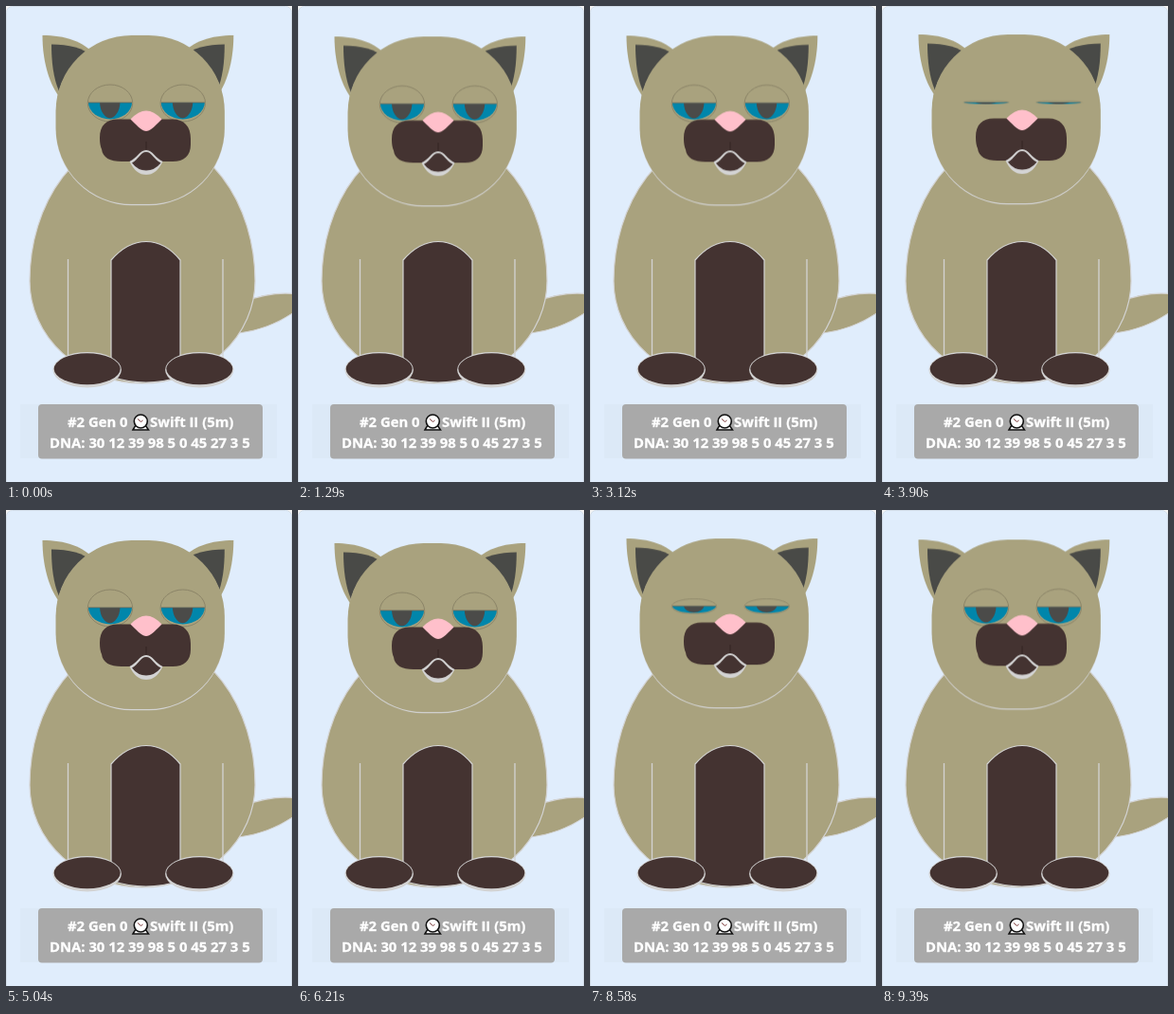
Write an HTML page without scripts that moves like this. It is 302 px wide and 502 px high and loops after 9.42 s.

```html
<!DOCTYPE html>
<html lang="en">
<head>
<meta charset="utf-8">
<title>Cat card</title>
<style>
  html, body { margin: 0; width: 100%; height: 100%; overflow: hidden; background: #f4f4f4; }
  svg { display: block; width: 302px; height: 502px; }
  .fur { fill: #a9a27e; }
  .dark { fill: #443331; }
  .edge { stroke: #d3d3d3; stroke-width: 1.2; }
  .rim { fill: #d3d3d3; }
  .inner { fill: #494a47; }
  .leg { fill: none; stroke: #d3d3d3; stroke-width: 1.3; }
  .lid { stroke: #5f655c; stroke-width: .8; vector-effect: non-scaling-stroke; }
  text {
    font: bold 14.85px "Open Sans", "Noto Sans", sans-serif;
    fill: #fff;
    stroke: #fff;
    stroke-width: .3;
  }

  /* bob and blink share one 942ms cycle */
  .head { animation: bob 942ms -810ms infinite; }
  .eye {
    transform-box: fill-box;
    transform-origin: center;
    animation: blink 942ms -810ms linear infinite;
  }
  @keyframes bob {
    0%, 100% { transform: translateY(-.9px); animation-timing-function: ease-in-out; }
    50% { transform: translateY(4.1px); animation-timing-function: ease-in-out; }
  }
  @keyframes blink {
    0%, 100% { transform: scaleY(.1); }
    9%, 91% { transform: scaleY(1); }
  }
</style>
</head>
<body>
<svg viewBox="0 0 302 502">
  <defs>
    <g id="ear">
      <path class="fur" d="M38.500 31C38.500 59 46 84 58 98L94 52C82 37 62 31 38.500 31Z"/>
      <path class="inner" d="M48 40.500C48 59 50 76 56 90L92 54C82 44 66 40.500 48 40.500Z"/>
    </g>
    <g id="eye">
      <ellipse class="fur" cx="110" cy="102.500" rx="23.700" ry="19.500" stroke="#8b8468"/>
      <path d="M87 101.900H133A23 17.500 0 0 1 87 101.900Z" fill="#0086ab"/>
      <path d="M99 101.900H120.500C120 111 115 118.300 109.700 118.300S99.500 111 99 101.900Z" fill="#4b4b49"/>
      <path class="lid" d="M87 101.900H133"/>
    </g>
    <g id="foot">
      <ellipse class="rim" cx="85.700" cy="383.700" rx="36.200" ry="18.800"/>
      <ellipse class="dark" cx="85.700" cy="382.700" rx="35" ry="16.500"/>
    </g>
  </defs>

  <rect x=".5" y=".5" width="301" height="510" rx="6" fill="#e0edfc" stroke="#d3deea"/>

  <path class="fur edge" d="M250 312Q280 301 304 303.500V323Q278 341 246 345Z"/>
  <path class="fur edge" d="M25 290A119 155 0 0 1 263 290A119 108 0 0 1 25 290Z"/>
  <path class="dark edge" d="M111 268Q128 248.500 148 248.500T184 268V391Q148 403 111 391Z"/>
  <path class="leg" d="M65.500 267V372M229 267V372"/>
  <use href="#foot"/>
  <use href="#foot" x="118.600"/>

  <g class="head">
    <use href="#ear"/>
    <use href="#ear" transform="matrix(-1 0 0 1 278.800 0)"/>
    <rect class="rim" x="52.600" y="32.200" width="178.200" height="178" rx="80"/>
    <rect class="fur" x="52.600" y="31" width="178.200" height="178" rx="80"/>

    <g class="eye"><use href="#eye"/></g>
    <g class="eye"><use href="#eye" x="76.800"/></g>

    <path class="dark" d="M99 139C99 126 106 119.500 118 119.500H176C188 119.500 195 127 195 140V146C195 158 188 164 176 164H122C110 164 102 160 101 151Q99 147 99 139Z"/>
    <path class="rim" d="M130.500 164C138 161 141 152 148 152S158 161 165.500 164Q159 178 148 178T130.500 164Z"/>
    <path class="dark" d="M133 165.500C140 162 142 154 148 154S156 162 163.500 165.500Q157 173.500 148 173.500T133 165.500Z"/>
    <path d="M148 143V152" stroke="#332523"/>
    <path d="M131.500 119.500Q140 110.500 148 110.500T164.500 119.500C156 128 152 132 148 132S140 128 131.500 119.500Z" fill="#ffc0cb"/>
  </g>

  <rect x="15" y="420" width="271" height="57" fill="#dce9f7"/>
  <rect x="34" y="420" width="237" height="57.500" rx="4" fill="#a9a9a9"/>
  <text x="65" y="444">#2 Gen 0</text>
  <g stroke="#111" fill="#fff">
    <path d="M134 447L137 442H147L150.500 447Z" stroke-width="1.500"/>
    <circle cx="142.300" cy="438" r="7" stroke-width="1.600"/>
    <path d="M139 435.500L142.500 438.500L144.500 437" fill="none" stroke="#733"/>
  </g>
  <text x="152" y="444">Swift II (5m)</text>
  <text x="46" y="466">DNA: 30 12 39 98 5 0 45 27 3 5</text>
</svg>
</body>
</html>
```
